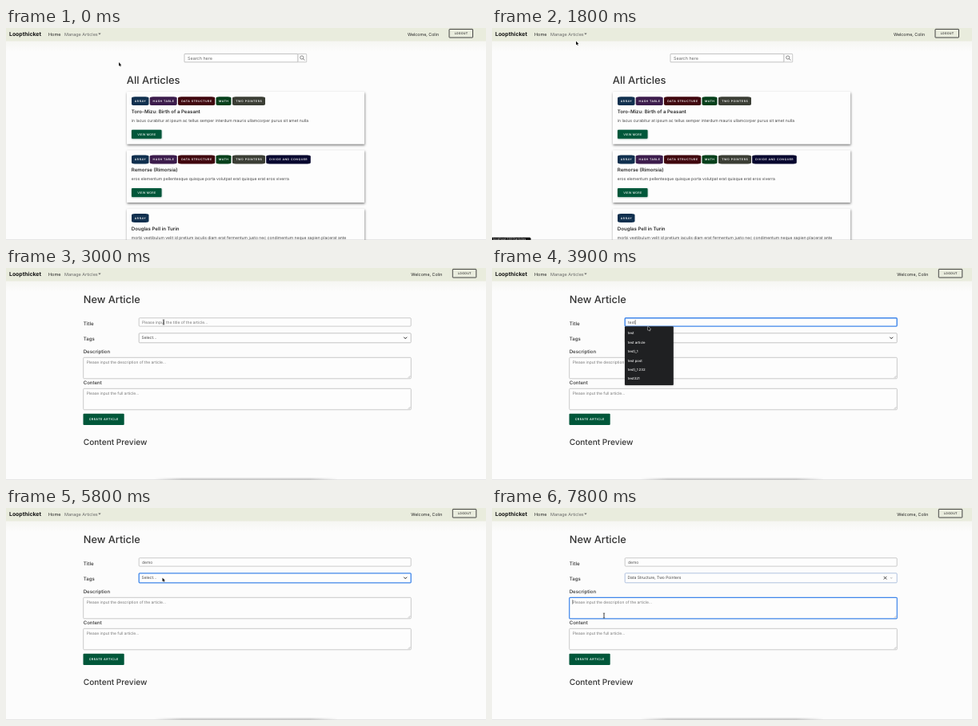
These frames come from a looping animation (600x266 px, 8000 ms). An HTML page with a canvas:

```html
<!DOCTYPE html>
<html lang="en">
<head>
<meta charset="utf-8">
<title>Articles</title>
<style>
html, body { margin: 0; width: 100%; height: 100%; overflow: hidden; background: #fcfcfc; }
canvas { display: block; width: 600px; height: 266px; }
</style>
</head>
<body>
<canvas id="stage"></canvas>
<script>
const W = 600, H = 266, LOOP = 8000;
const canvas = document.getElementById('stage');
const ctx = canvas.getContext('2d');
const dpr = window.devicePixelRatio || 1;
canvas.width = W * dpr;
canvas.height = H * dpr;

const INK = '#333', MUTED = '#777', GREEN = '#00573a', BLUE = '#3f86ea', LINE = '#b5b5b5';
const PAGE_AT = 2400;

const TAGS = [
  { name: 'Array', x: 157, w: 21.5, fill: '#10304f' },
  { name: 'Hash Table', x: 179.7, w: 34, fill: '#3c1c4c' },
  { name: 'Data Structure', x: 215, w: 46.2, fill: '#40070e' },
  { name: 'Math', x: 262.5, w: 19, fill: '#06401b' },
  { name: 'Two Pointers', x: 283, w: 41, fill: '#3b3e35' },
  { name: 'Divide and Conquer', x: 325.2, w: 55.6, fill: '#07072f' }
];

const CARDS = [
  { y: 80, tags: 5, title: 'Toro-Mizu: Birth of a Peasant',
    text: 'in lacus curabitur at ipsum ac tellus semper interdum mauris ullamcorper purus sit amet nulla' },
  { y: 153.3, tags: 6, title: 'Remorse (Rimorsia)',
    text: 'eros elementum pellentesque quisque porta volutpat erat quisque erat eros viverra' },
  { y: 226.8, tags: 1, title: 'Douglas Pell in Turin',
    text: 'morbi vestibulum velit id pretium iaculis diam erat fermentum justo nec condimentum neque sapien placerat ante' }
];

const HINTS = ['test', 'test article', 'test)_1', 'test post', 'test)_1 232', 'test321'];

// time, x, y of the pointer
const PATH = [
  [200, 141, 43], [900, 104, 10], [1300, 104, 10], [1800, 105, 16.5], [2200, 106, 19],
  [2800, 197, 68], [3100, 197, 68], [3400, 195, 73.5], [5500, 195, 73.5], [5800, 195.5, 87.5],
  [6100, 195.5, 88], [6600, 189, 144], [6800, 189, 145], [7100, 186, 165.5], [7300, 186, 171],
  [7400, 186, 171], [7700, 140, 135]
];

// time, value of the title field
const TYPED = [
  [3400, 't'], [3500, 'te'], [3600, 'tes'], [3700, 'test'], [4200, 'tes'], [4300, 'te'],
  [4400, 't'], [4500, ''], [4600, 'd'], [4700, 'de'], [4800, 'dem'], [4900, 'demo']
];

function text(str, x, y, size, color = INK, weight = 400, spacing = 0, align = 'left') {
  ctx.font = `${weight} ${size}px Inter, "Open Sans", sans-serif`;
  ctx.letterSpacing = spacing + 'px';
  ctx.textAlign = align;
  ctx.fillStyle = color;
  ctx.fillText(str, x, y);
}

function box(x, y, w, h, r, fill, stroke, lw = 0.7) {
  ctx.beginPath();
  ctx.roundRect(x, y, w, h, r);
  if (fill) { ctx.fillStyle = fill; ctx.fill(); }
  if (stroke) { ctx.strokeStyle = stroke; ctx.lineWidth = lw; ctx.stroke(); }
}

function line(points, color, lw) {
  ctx.beginPath();
  points.forEach(([x, y]) => ctx.lineTo(x, y));
  ctx.strokeStyle = color;
  ctx.lineWidth = lw;
  ctx.stroke();
}

function shadow(color, blur, dx, dy, draw) {
  ctx.save();
  ctx.shadowColor = color;
  ctx.shadowBlur = blur * dpr;
  ctx.shadowOffsetX = dx * dpr;
  ctx.shadowOffsetY = dy * dpr;
  draw();
  ctx.restore();
}

function backdrop() {
  ctx.fillStyle = '#fcfcfc';
  ctx.fillRect(0, 0, W, H);
  const fade = ctx.createLinearGradient(0, 16, 0, 30);
  fade.addColorStop(0, '#f5f6f2');
  fade.addColorStop(1, '#fcfcfc');
  ctx.fillStyle = fade;
  ctx.fillRect(0, 16, W, 14);
}

function navbar(dx) {
  ctx.fillStyle = '#e9ecdd';
  ctx.fillRect(0, 0, W, 16.5);
  text('Loopthicket', 4, 10, 6.9, '#111', 700);
  text('Home', 53, 9.6, 5.5, '#222');
  text('Manage Articles', 73, 9.6, 5.45, '#666');
  ctx.beginPath();
  ctx.moveTo(115.3, 6.6);
  ctx.lineTo(118.6, 6.6);
  ctx.lineTo(116.95, 8.4);
  ctx.fill();
  text('Welcome, Colin', 502 + dx, 9.6, 5.3, '#222');
  box(554 + dx, 1.5, 29.5, 10.5, 0.5, null, '#333', 0.9);
  text('LOGOUT', 569 + dx, 8.2, 3.7, '#222', 500, 0.2, 'center');
}

function chip(tag, y) {
  box(tag.x, y, tag.w, 10.8, { x: 4, y: 1.6 }, tag.fill);
  text(tag.name.toUpperCase(), tag.x + tag.w / 2 + 0.25, y + 6.8, 3.5, '#f4f4f4', 600, 0.5, 'center');
}

function card({ y, tags, title, text: body }) {
  shadow('rgba(0,0,0,0.5)', 3, 0.5, 1.5, () => box(151, y, 297, 65.7, 0.5, '#fdfdfd'));
  TAGS.slice(0, tags).forEach(tag => chip(tag, y + 6.3));
  text(title, 156.8, y + 27, 6.1, '#2b2b2b', 600);
  text(body, 156.8, y + 37.7, 5.05, '#444');
  shadow('rgba(0,70,45,0.55)', 2, 0, 0.6, () => box(157, y + 47.7, 37.5, 11, 1, GREEN));
  text('VIEW MORE', 175.8, y + 54.6, 3.7, '#e9f3ee', 500, 0.2, 'center');
}

function listPage() {
  box(223, 32.5, 142, 10.3, 0.5, '#fff', '#aaa');
  text('Search here', 227, 39.5, 5.4, '#666');
  box(365, 32.5, 10.7, 10.3, 0.5, '#fcfcfc', LINE);
  ctx.beginPath();
  ctx.arc(369.8, 37, 2.1, 0, Math.PI * 2);
  ctx.strokeStyle = '#444';
  ctx.lineWidth = 0.6;
  ctx.stroke();
  line([[371.3, 38.5], [373.3, 40.5]], '#444', 0.7);
  text('All Articles', 150.8, 70.3, 13, INK, 500);
  CARDS.forEach(card);
}

function statusBar() {
  box(-2, 262.7, 50.5, 5, 1.5, '#161616');
  text('localhost:3000/articles', 1, 266.2, 3.8, '#c8c8c8');
}

function area(y, hint, focused) {
  box(96.7, y, 409.6, 26.5, 1, '#fdfdfd', focused ? BLUE : LINE, focused ? 1.2 : 0.7);
  text(hint, 100.8, y + 7.2, 4.93, MUTED);
  line([[502.8, y + 25.4], [505.2, y + 23]], '#888', 0.5);
  line([[504.2, y + 25.4], [505.2, y + 24.4]], '#888', 0.5);
  if (focused) line([[100.7, y + 2.8], [100.7, y + 8.4]], '#222', 0.5);
}

function titleField(value, focused) {
  box(166.2, 62.7, 340, 10.4, 1, '#fdfdfd', focused ? BLUE : LINE, focused ? 1.4 : 0.7);
  if (value) text(value, 170, 69.6, 5, '#555');
  else text('Please input the title of the article...', 170, 69.6, 4.95, MUTED);
  if (!focused) return;
  const x = value ? 170.4 + ctx.measureText(value).width : 170;
  line([[x, 65], [x, 71]], '#222', 0.5);
}

function chevron(up, color) {
  const d = up ? -1 : 1;
  line([[497.3, 87.7 - d], [499.2, 87.7 + d], [501.1, 87.7 - d]], color, 1);
}

function tagField(picked, focused, open, done) {
  const edge = done ? '#9db4d8' : focused ? BLUE : LINE;
  box(166.2, 81.8, 340, 12, 1, '#fdfdfd', edge, focused ? 1.3 : 0.8);
  text(picked.length ? picked.join(', ') : 'Select...', 169.5, 89.4, 4.95, '#444');
  if (picked.length) {
    line([[489.7, 85.9], [493.3, 89.5]], INK, 0.9);
    line([[493.3, 85.9], [489.7, 89.5]], INK, 0.9);
  }
  if (done) line([[498, 87.4], [499.2, 88.2], [500.4, 87.4]], '#888', 0.6);
  else chevron(open, '#222');
}

function checkbox(y, checked) {
  box(169.8, y - 2, 3.8, 3.8, 0.6, checked ? '#2374e1' : '#fff', checked ? '#2374e1' : '#777', 0.6);
  if (checked) line([[170.6, y], [171.4, y + 0.8], [172.8, y - 1]], '#fff', 0.6);
}

function tagMenu(picked, active) {
  shadow('rgba(0,0,0,0.2)', 2, 0, 0.6, () => box(166.2, 95, 340, 96, 0.8, '#fdfdfd', '#c4c4c4', 0.6));
  text('Search', 169.5, 103.8, 4.95, MUTED);
  line([[166.5, 108.6], [506, 108.6]], '#bdbdbd', 0.6);
  ctx.save();
  ctx.beginPath();
  ctx.rect(166.5, 108.9, 339.4, 81.9);
  ctx.clip();
  TAGS.forEach(({ name }, i) => {
    const y = 115.7 + i * 14.25;
    if (name === active) {
      ctx.fillStyle = '#dadde2';
      ctx.fillRect(166.5, y - 7.1, 335.5, 14.2);
    }
    line([[166.5, y + 7.1], [502, y + 7.1]], '#e4e4e4', 0.5);
    checkbox(y, picked.includes(name));
    text(name, 175.5, y + 1.8, 5, '#4a4a4a');
  });
  ctx.fillStyle = '#ececec';
  ctx.fillRect(502, 108.9, 4, 82);
  box(502.5, 109.6, 2.8, 28, 1.2, '#858585');
  ctx.restore();
}

function hintMenu() {
  shadow('rgba(0,0,0,0.3)', 2, 0, 0.5, () => box(166, 73.3, 60.8, 73.7, 1, '#1f2022'));
  HINTS.forEach((hint, i) => text(hint, 169.8, 83.4 + i * 11.4, 4.3, '#f2f2f2', 500));
}

function formPage(t) {
  const value = TYPED.reduce((v, [at, str]) => t >= at ? str : v, '');
  const picked = [];
  if (t >= 6700) picked.push('Data Structure');
  if (t >= 7400) picked.push('Two Pointers');
  const active = t >= 7400 ? 'Two Pointers' : t >= 6600 ? 'Data Structure' : '';
  const open = t >= 6100 && t < 7700;
  const done = t >= 7800;

  text('New Article', 96.7, 44.2, 12.8, INK, 500);
  text('Title', 96.7, 71.9, 6.2, INK, 500);
  text('Tags', 96.7, 90.7, 6.1, INK, 500);
  text('Description', 96.7, 107.3, 6.1, INK, 500);
  text('Content', 96.7, 146.2, 6.1, INK, 500);
  titleField(value, t >= 3300 && t < 5000);
  tagField(picked, t >= 5000 && !done, open, done);
  area(112.3, 'Please input the description of the article...', done);
  area(151.3, 'Please input the full article...', false);
  box(96.5, 182.8, 51.2, 14.2, 1, GREEN);
  text('CREATE ARTICLE', 122.2, 191.3, 3.75, '#f2f7f4', 600, 0.4, 'center');
  text('Content Preview', 96.7, 221.9, 10.15, INK, 500);

  if (t >= 3400 && t < 4500) hintMenu();
  if (open) tagMenu(picked, active);

  const glow = ctx.createLinearGradient(185, 0, 415, 0);
  glow.addColorStop(0, 'rgba(120,120,120,0)');
  glow.addColorStop(0.15, 'rgba(120,120,120,0.3)');
  glow.addColorStop(0.85, 'rgba(120,120,120,0.3)');
  glow.addColorStop(1, 'rgba(120,120,120,0)');
  ctx.fillStyle = glow;
  ctx.fillRect(185, 263.5, 230, 2.5);
}

function pointerAt(t) {
  const next = PATH.findIndex(([at]) => at > t);
  if (next === 0) return PATH[0].slice(1);
  if (next < 0) return PATH[PATH.length - 1].slice(1);
  const [t0, x0, y0] = PATH[next - 1], [t1, x1, y1] = PATH[next];
  const k = (t - t0) / (t1 - t0), e = k * k * (3 - 2 * k);
  return [x0 + (x1 - x0) * e, y0 + (y1 - y0) * e];
}

function outline(points, fill, stroke) {
  ctx.beginPath();
  points.forEach(([x, y]) => ctx.lineTo(x, y));
  ctx.closePath();
  ctx.lineJoin = 'round';
  ctx.strokeStyle = stroke;
  ctx.lineWidth = 0.8;
  ctx.stroke();
  ctx.fillStyle = fill;
  ctx.fill();
}

function pointer(t) {
  const [x, y] = pointerAt(t);
  ctx.save();
  ctx.translate(x, y);
  if ((t >= 2700 && t < 3300) || t >= 7700) {
    line([[0, -2.8], [0, 2.8]], '#111', 0.8);
    line([[-1.2, -2.9], [1.2, -2.9]], '#111', 0.6);
    line([[-1.2, 2.9], [1.2, 2.9]], '#111', 0.6);
  } else if (t >= 6300) {
    outline([[0, 0], [1, 0], [1.2, 2], [4, 2.7], [4, 4.6], [3.3, 6.2], [1, 6.2], [-1, 3.8], [-0.6, 3], [0.3, 3.6]], '#fff', '#222');
  } else {
    outline([[0, 0], [0, 4.7], [1.1, 3.8], [1.9, 5.5], [2.7, 5.1], [2, 3.5], [3.4, 3.4]], '#111', '#fff');
  }
  ctx.restore();
}

function draw(t) {
  ctx.setTransform(dpr, 0, 0, dpr, 0, 0);
  ctx.textRendering = 'geometricPrecision';
  const form = t >= PAGE_AT;
  backdrop();
  navbar(form ? 4.3 : 0);
  if (form) formPage(t);
  else listPage();
  line([[0, 265.6], [W, 265.6]], 'rgba(150,150,150,0.4)', 0.6);
  if (t >= 900 && !form) statusBar();
  pointer(t);
}

// the screen refreshes in steps of 100 ms
const start = performance.now();
function tick(now) {
  const t = Math.max(0, now - start) % LOOP;
  draw(Math.floor(t / 100) * 100);
  requestAnimationFrame(tick);
}
draw(0);
requestAnimationFrame(tick);
</script>
</body>
</html>
```
